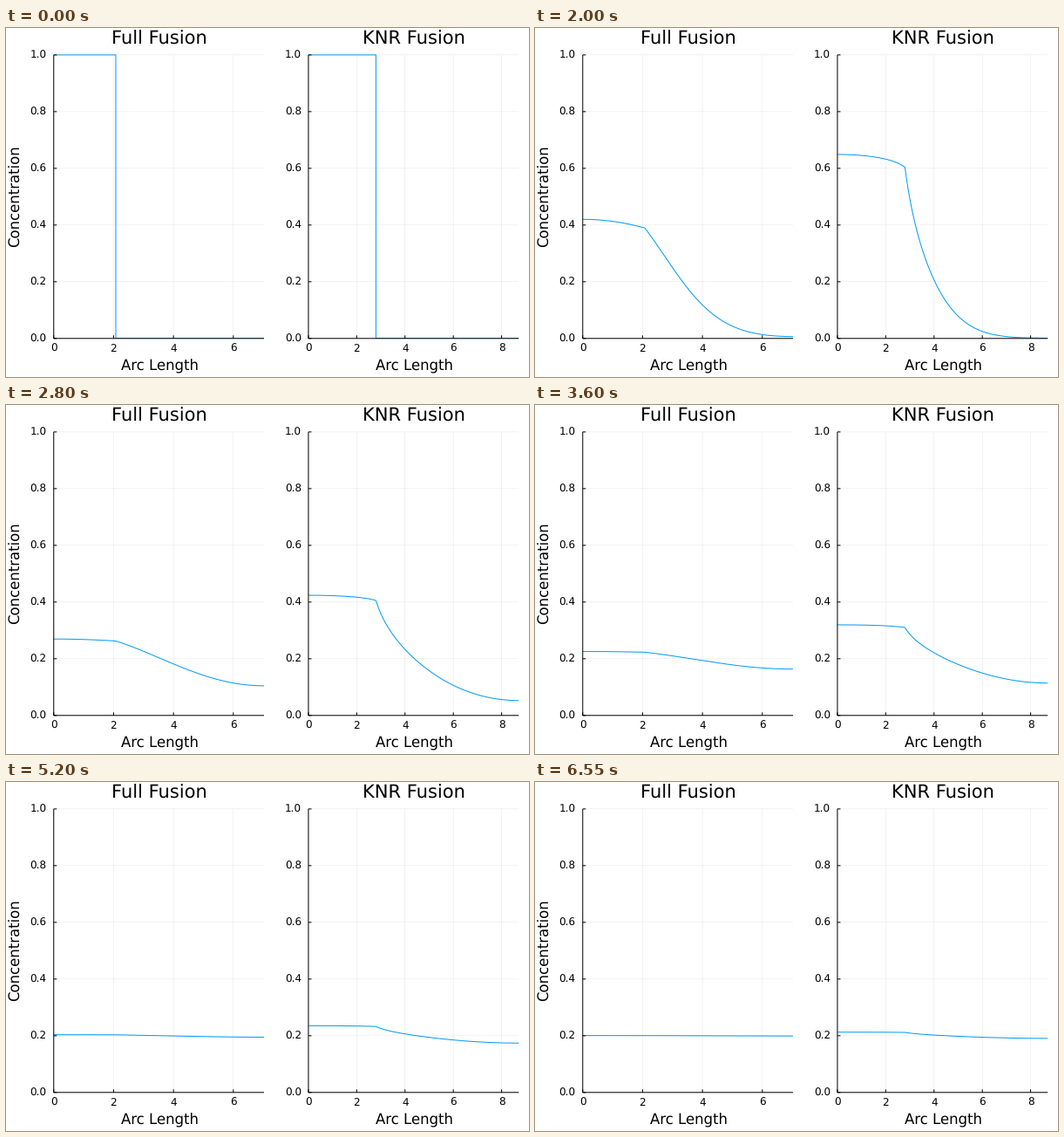
A matplotlib script that plays this animation: 600 px wide and 400 px high, repeating every 6600 ms.

```python
import numpy as np
import matplotlib.pyplot as plt
from matplotlib.animation import FuncAnimation
from matplotlib.transforms import Bbox

W, H, DPI = 600, 400, 100
PX = 72 / DPI                       # points per pixel
TOP, BOTTOM, WIDTH = 30.87, 355.8, 241.24
FRAMES, INTERVAL, HOLD = 132, 50, 31
BLUE = "#009afa"
TICK, GUIDE, TITLE = 12, 16.5, 21   # text sizes in pixels

plt.rcParams.update({"font.family": "DejaVu Sans", "text.hinting": "none"})


class Surface:
    """Diffusion along the meridian of two spherical caps joined at a rim."""

    def __init__(self, r1, edge, r2, rim, d1, d2, n1=140, n2=260):
        self.edge = r1 * edge
        self.length = self.edge + r2 * (np.pi - rim)
        self.s = np.r_[np.linspace(0, self.edge, n1 + 1),
                       np.linspace(self.edge, self.length, n2 + 1)[1:]]
        mid = (self.s[1:] + self.s[:-1]) / 2
        inner = mid < self.edge
        angle = np.where(inner, mid / r1, rim + (mid - self.edge) / r2)
        radius = np.where(inner, r1, r2)

        cap = r1**2 * (1 - np.cos(edge))
        total = cap + r2**2 * (1 + np.cos(rim))
        area = np.where(inner, r1**2 * (1 - np.cos(angle)),
                        cap + r2**2 * (np.cos(rim) - np.cos(angle)))
        bounds = np.r_[0, area, total]
        vol = np.diff(bounds)
        start = np.clip((cap - bounds[:-1]) / vol, 0, 1)

        flow = np.where(inner, d1, d2) * radius * np.sin(angle) / np.diff(self.s)
        lap = np.diag(np.r_[flow, 0] + np.r_[0, flow])
        lap -= np.diag(flow, 1) + np.diag(flow, -1)
        root = np.sqrt(vol)
        self.rate, vec = np.linalg.eigh(lap / np.outer(root, root))
        self.weight = vec.T @ (root * start)
        self.modes = vec / root[:, None]

    def curve(self, t):
        if t == 0:
            return np.array([0, self.edge, self.edge, self.length]), np.array([1, 1, 0, 0])
        return self.s, self.modes @ (self.weight * np.exp(-self.rate * t))


def full_fusion():
    r, edge = np.sqrt(5), np.arccos(0.6)
    return Surface(r, edge, r, edge, 0.68, 0.1435)


def neck_fusion(neck=0.4):
    c1, c2 = 1 - neck**2 / 2, 1 - neck**2 / 8
    return Surface(np.sqrt(2 / (1 + c1)), np.pi - np.arccos(c1),
                   np.sqrt(8 / (1 + c2)), np.arccos(c2), 1.6, 0.1595)


# one canvas whose data units are pixels, y pointing down
fig = plt.figure(figsize=(W / DPI, H / DPI), dpi=DPI, facecolor="white")
ax = fig.add_axes([0, 0, 1, 1], xlim=(0, W), ylim=(H, 0))
ax.axis("off")


def stroke(xs, ys, color="black", width=1.0, **kw):
    line, = ax.plot(xs, ys, color=color, linewidth=width * PX, snap=False,
                    solid_capstyle="butt", **kw)
    return line


def label(x, y, text, size, ha="center", **kw):
    ax.text(x, y, text, fontsize=size * PX, ha=ha, va="baseline", **kw)


class Panel:
    def __init__(self, left, title, surface, xticks):
        self.left, self.surface = left, surface
        right, mid = left + WIDTH, left + WIDTH / 2 + 0.6

        for v in xticks:
            x = self.px(v)
            stroke([x, x], [TOP, BOTTOM], width=0.5, alpha=0.1, zorder=1)
            stroke([x, x], [BOTTOM, BOTTOM - 3.5], zorder=3)
            label(x, 371.2, str(v), TICK)
        for v in np.arange(6) / 5:
            y = self.py(v)
            stroke([left, right], [y, y], width=0.5, alpha=0.1, zorder=1)
            stroke([left, left + 3.5], [y, y], zorder=3)
            label(left - 8, y + 4.375, f"{v:.1f}", TICK, ha="right")
        stroke([left, left], [TOP, BOTTOM], zorder=3)
        stroke([left, right], [BOTTOM, BOTTOM], zorder=3)

        label(mid, 18.7, title, TITLE)
        label(mid, 392.2, "Arc Length", GUIDE)
        self.line = stroke([], [], BLUE, zorder=2)
        self.line.set_clip_box(Bbox.from_extents(55, H - 356, 589, H - 30))

    def px(self, s):
        return self.left + WIDTH * s / self.surface.length

    def py(self, u):
        return BOTTOM - (BOTTOM - TOP) * u

    def update(self, t):
        s, u = self.surface.curve(t)
        self.line.set_data(self.px(s), self.py(u))


panels = [Panel(54.76, "Full Fusion", full_fusion(), [0, 2, 4, 6]),
          Panel(346.95, "KNR Fusion", neck_fusion(), [0, 2, 4, 6, 8])]
label(16, 192.6, "Concentration", GUIDE, rotation=90, rotation_mode="anchor")


def draw(i):
    for panel in panels:
        panel.update(max(0, i - HOLD))
    return [panel.line for panel in panels]


anim = FuncAnimation(fig, draw, frames=FRAMES, interval=INTERVAL,
                     init_func=lambda: draw(0), repeat=True, repeat_delay=0)
plt.show()
```
